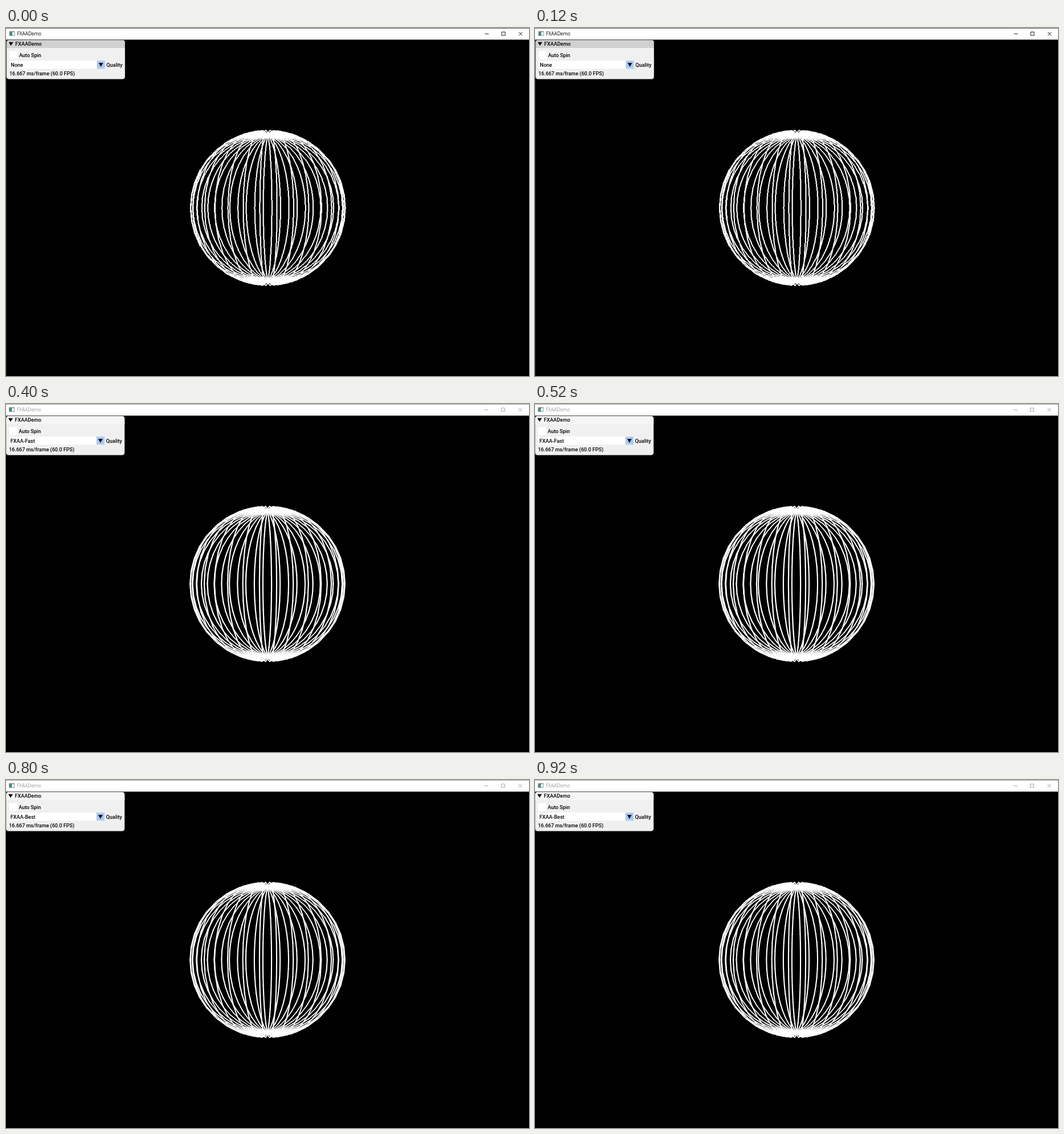
Write an HTML page with a canvas that moves like this. It is 918 px wide and 610 px high and loops after 1 s.

```html
<!DOCTYPE html>
<html lang="en">
<head>
<meta charset="utf-8">
<title>FXAADemo</title>
<style>
  html, body { margin: 0; width: 100%; height: 100%; overflow: hidden; background: #000; }
  canvas, svg { position: absolute; left: 0; top: 0; width: 918px; height: 610px; }
  .ui { font: 500 9px Roboto, sans-serif; fill: #000; }
  .caption { font: 8.2px "Open Sans", sans-serif; }
</style>
</head>
<body>
<canvas id="view" width="918" height="610"></canvas>
<svg viewBox="0 0 918 610">
  <rect id="edge" y="20" width="0.7" height="590"/>
  <rect width="918" height="20.4" fill="#fff"/>
  <rect id="top" width="918" height="0.8"/>
  <g id="win">
    <g>
      <rect x="5.2" y="5.6" width="9.6" height="8.2" fill="#7d878c"/>
      <rect x="6" y="7" width="4" height="6" fill="#3f8f7c"/>
      <rect x="10.4" y="7" width="3.6" height="6" fill="#f4f6f6"/>
    </g>
    <text id="caption" class="caption" x="18.9" y="13.2">FXAADemo</text>
    <path id="buttons" fill="none" stroke-width="0.9"
      d="M839.8 10.3h6.8M869.4 7h6v6h-6zM899.4 6.9l6.4 6.4m0-6.4l-6.4 6.4"/>
    <g class="ui">
      <rect x="0.1" y="20.9" width="208.2" height="68.8" rx="4.5" fill="#f0f0f0"/>
      <path id="bar" d="M0.1 35V25.4a4.5 4.5 0 0 1 4.5-4.5H203.8a4.5 4.5 0 0 1 4.5 4.5V35z"/>
      <rect x="0.4" y="21.2" width="207.6" height="68.2" rx="4.3" fill="none" stroke="#000" stroke-opacity="0.3" stroke-width="0.7"/>
      <path d="M4 24.7h8l-4 6.3z"/>
      <text x="15.6" y="30.8">FXAADemo</text>
      <rect x="5.3" y="40.3" width="14" height="14" fill="#fff"/>
      <text x="22.2" y="50.5">Auto Spin</text>
      <rect x="5.3" y="57.3" width="153.5" height="14" fill="#fff"/>
      <rect x="158.8" y="57.3" width="14" height="14" fill="#aaccf4"/>
      <path d="M161.8 61.3h8l-4 6.6z"/>
      <text id="mode" x="7.8" y="67.6"></text>
      <text x="175.6" y="67.6">Quality</text>
      <text x="5.2" y="82.6">16.667 ms/frame (60.0 FPS)</text>
    </g>
  </g>
</svg>
<script>
const $ = id => document.getElementById(id);
const ctx = $('view').getContext('2d');

// nudge: window offset; jag: weight of the unsmoothed lines
const STATES = [
  { mode: 'None', nudge: 0.7, jag: 1, focus: true, bar: '#d1d1d1', edge: '#333' },
  { mode: 'FXAA-Default', nudge: 0, jag: 0, bar: '#d1d1d1' },
  { mode: 'FXAA-Fast', nudge: 0, jag: 0.3, bar: '#f5f5f5' },
  { mode: 'FXAA-High', nudge: 0.7, jag: 0, bar: '#f5f5f5', edge: '#666' },
  { mode: 'FXAA-Best', nudge: 0, jag: 0, bar: '#f5f5f5' }
];
const STEP = 200;
const MERIDIANS = 40, STACKS = 20, TWIST = 0.0052;
const FOCAL = 385, DIST = 3, CX = 459, CY = 315.3;
const PIXEL = 0.7, GRID = 400, LINE = 3;

// Perspective view of a unit sphere point
function project(lat, lon) {
  const z = Math.cos(lat) * Math.cos(lon);
  const k = FOCAL / (DIST - z);
  return [k * Math.cos(lat) * Math.sin(lon), -k * Math.sin(lat)];
}

const segments = [];
for (let m = 0; m < MERIDIANS; m++) {
  const lon = (m + 0.5) * 2 * Math.PI / MERIDIANS + TWIST;
  let last = project(-Math.PI / 2, lon);
  for (let s = 1; s <= STACKS; s++) {
    const next = project((s / STACKS - 0.5) * Math.PI, lon);
    segments.push([...last, ...next]);
    last = next;
  }
}

// Aliased lines on the native pixel grid
function rasterize() {
  const canvas = document.createElement('canvas');
  canvas.width = canvas.height = GRID;
  const g = canvas.getContext('2d');
  g.fillStyle = '#fff';
  for (const seg of segments) {
    const [x0, y0, x1, y1] = seg.map(v => v / PIXEL + GRID / 2);
    const dx = x1 - x0, dy = y1 - y0;
    const steep = Math.abs(dy) >= Math.abs(dx);
    const n = Math.max(1, Math.ceil(Math.max(Math.abs(dx), Math.abs(dy))));
    for (let i = 0; i <= n; i++) {
      const x = Math.floor(x0 + dx * i / n), y = Math.floor(y0 + dy * i / n);
      if (steep) g.fillRect(x - 1, y, LINE, 1);
      else g.fillRect(x, y - 1, 1, LINE);
    }
  }
  return canvas;
}
const jagged = rasterize();

function drawSmooth(cx) {
  ctx.strokeStyle = '#fff';
  ctx.lineCap = 'round';
  for (const [x0, y0, x1, y1] of segments) {
    const dx = x1 - x0, dy = y1 - y0;
    ctx.lineWidth = LINE * PIXEL * Math.max(Math.abs(dx), Math.abs(dy)) / Math.hypot(dx, dy);
    ctx.beginPath();
    ctx.moveTo(cx + x0, CY + y0);
    ctx.lineTo(cx + x1, CY + y1);
    ctx.stroke();
  }
}

function drawJagged(cx, alpha) {
  const size = GRID * PIXEL;
  ctx.globalAlpha = alpha;
  ctx.imageSmoothingQuality = 'high';
  ctx.drawImage(jagged, cx - size / 2, CY - size / 2, size, size);
  ctx.globalAlpha = 1;
}

function show({ mode, nudge, jag, focus, bar, edge }) {
  const ink = focus ? '#000' : '#999';
  $('mode').textContent = mode;
  $('win').setAttribute('transform', `translate(${nudge} 0)`);
  $('bar').setAttribute('fill', bar);
  $('edge').setAttribute('fill', edge || 'none');
  $('top').setAttribute('fill', focus ? '#444' : '#888');
  $('caption').setAttribute('fill', ink);
  $('buttons').setAttribute('stroke', ink);

  ctx.fillStyle = '#000';
  ctx.fillRect(0, 0, 918, 610);
  if (jag < 1) drawSmooth(CX + nudge);
  if (jag > 0) drawJagged(CX + nudge, jag);
}

let current = -1;
const start = performance.now();
function tick() {
  const index = Math.floor((performance.now() - start) / STEP) % STATES.length;
  if (index !== current) show(STATES[current = index]);
  requestAnimationFrame(tick);
}
tick();
</script>
</body>
</html>
```
